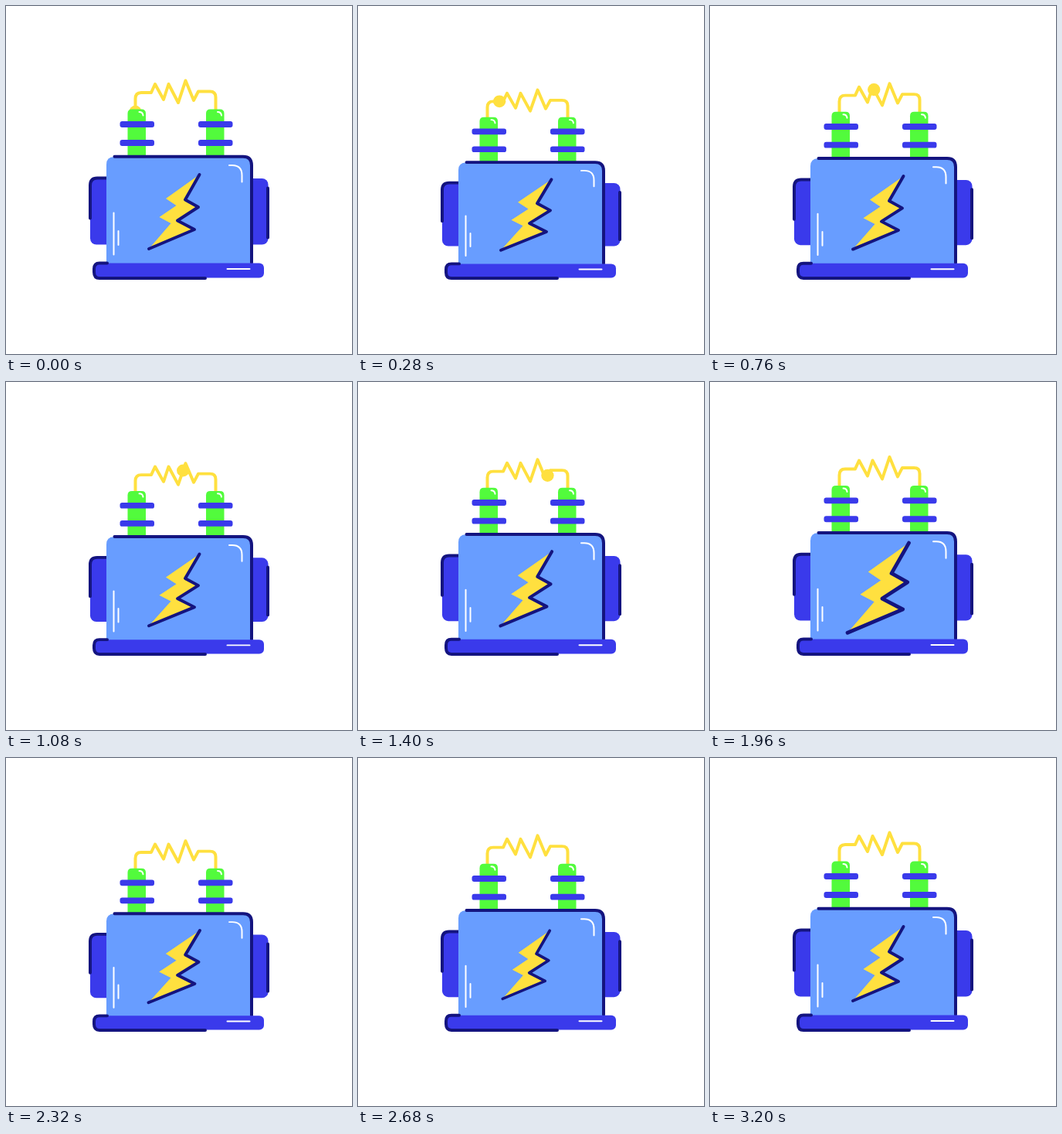
An HTML page for the animation above (3.24 s loop, 448x450 px).

```html
<!DOCTYPE html>
<html lang="en">
<head>
<meta charset="utf-8">
<title>Transformer</title>
<style>
  html, body { margin: 0; width: 100%; height: 100%; overflow: hidden; background: #fff; }
  svg { display: block; width: 100%; height: 100%; }
  .line { fill: none; stroke-width: 4; stroke-linecap: round; stroke-linejoin: round; }
  .dark { stroke: #14147f; }
  .shine { fill: none; stroke: #fff; stroke-width: 2; stroke-linecap: round; }
  .blue { fill: #3a3aeb; }
  .sky { fill: #689dff; }
  .green { fill: #52fb3c; }
  .yellow { fill: #ffe03f; }
</style>
</head>
<body>
<svg viewBox="0 0 448 450">
  <defs>
    <g id="insulator">
      <path class="green" d="M0 195V139Q0 133.500 5.500 133.500H18Q23.500 133.500 23.500 139V195Z"/>
      <rect class="blue" x="-10" y="149" width="44.500" height="8" rx="3"/>
      <rect class="blue" x="-10" y="173" width="44.500" height="8" rx="3"/>
      <path class="shine" d="M15 137Q19.500 137 20 141.500"/>
    </g>
  </defs>
  <g id="machine">
    <path id="wire" class="line" stroke="#ffe03f" d="M167.500 137V120Q167.500 112 175 112H188L193 101L204 121L210.500 101L223 125L232.500 96.500L243 122L249 110.500H264Q271.500 110.500 271.500 118V137"/>
    <circle id="spark" class="yellow" r="8.200"/>
    <use href="#insulator" x="157.500"/>
    <use href="#insulator" x="259"/>

    <rect class="blue" x="109" y="222" width="30" height="86.500" rx="8"/>
    <path class="line dark" d="M131 222.500H118Q109 222.500 109 232V274.500"/>
    <rect class="blue" x="308" y="223" width="31.500" height="85.500" rx="8"/>
    <path class="line dark" d="M339 235.500V299.500"/>

    <path class="sky" d="M130 334V205Q130 195 140 195H308Q319 195 319 206V334Z"/>
    <path class="line dark" d="M140.500 194.700H307Q318 194.700 318 206V332"/>
    <path class="shine" d="M289 206H293Q305.500 206 305.500 219V227.500M139.500 267.500V321.500M145.500 291V309"/>

    <rect class="blue" x="113" y="332.500" width="221" height="19" rx="6"/>
    <path class="line dark" d="M131 332.500H121Q114 332.500 114 340V344Q114 352 121 352H258"/>
    <path class="shine" d="M286.500 340H315.500"/>

    <g id="bolt">
      <path class="yellow" d="M250.500 218L207 249L220.500 258L198.500 273L213.500 281L185 314L244 289L222 277.500L249 260L232 250Z"/>
      <path class="line dark" d="M250.500 218L232 250.500L249 260L222 277.500L244 289L185 314"/>
    </g>
  </g>
</svg>
<script>
  const LOOP = 3240, STEP = 40, BEAT = 640, TRAVEL = 1800;
  const [machine, wire, spark, bolt] =
    ["machine", "wire", "spark", "bolt"].map(id => document.getElementById(id));
  const wireLength = wire.getTotalLength();
  const boltScales = [1, 1, 1, 1.215, 0.925, 1, 1];
  const ease = u => (1 - Math.cos(Math.PI * u)) / 2;

  const scaleAbout = (el, x, y, sx, sy) =>
    el.setAttribute("transform", `translate(${x} ${y}) scale(${sx} ${sy}) translate(${-x} ${-y})`);

  function boltScale(t) {
    const i = Math.floor(t / BEAT);
    return boltScales[i] + (boltScales[i + 1] - boltScales[i]) * ease(t / BEAT - i);
  }

  function draw(now) {
    const t = Math.floor(now % LOOP / STEP) * STEP;
    // The machine squashes against the floor once per beat.
    scaleAbout(machine, 224, 352, 1, 1 - 0.049 * ease(2 * t / BEAT));
    const s = boltScale(t);
    scaleAbout(bolt, 217.5, 266, s, s);

    const p = wire.getPointAtLength(wireLength * Math.min(t / TRAVEL, 1));
    spark.setAttribute("cx", p.x);
    spark.setAttribute("cy", p.y);
    spark.setAttribute("visibility", t < TRAVEL ? "visible" : "hidden");
  }

  const start = performance.now();
  function tick() {
    draw(performance.now() - start);
    requestAnimationFrame(tick);
  }
  tick();
</script>
</body>
</html>
```
